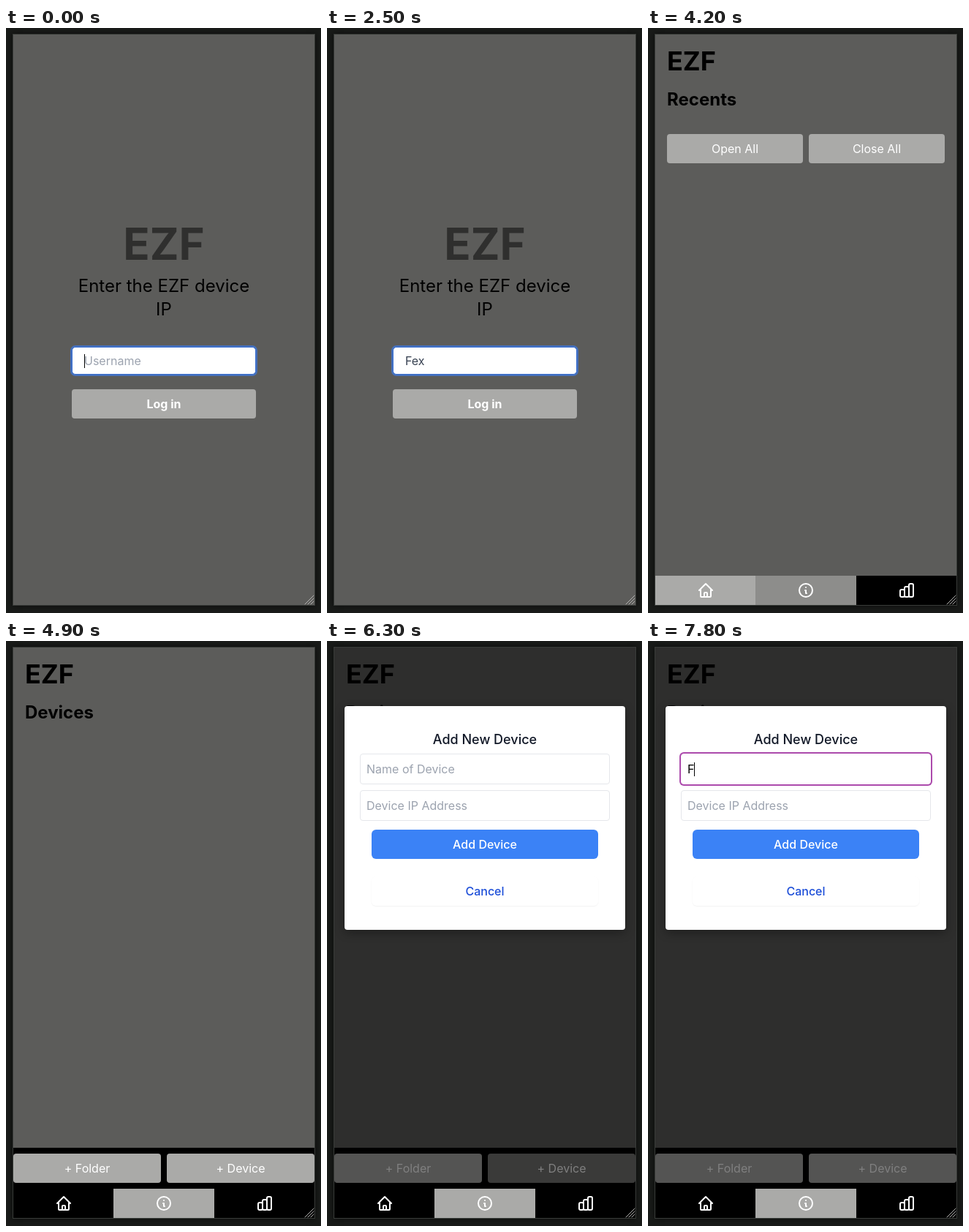
Recreate the animation shown at these times as an HTML page. Size 431 by 800 pixels, loop 8000 ms.

```html
<!DOCTYPE html>
<html lang="en">
<head>
<meta charset="utf-8">
<title>Device manager</title>
<style>
  html, body { margin: 0; width: 100%; height: 100%; overflow: hidden; background: #191b19; }
  body { position: relative; font: 16px Inter, sans-serif; color: #000; }
  div, svg { position: absolute; box-sizing: border-box; white-space: pre; }
  [hidden] { display: none; }
  .screen { left: 0; top: 0; width: 431px; height: 800px; }
  .page { left: 10px; top: 9px; width: 412px; height: 780px; background: #5c5c5a;
    box-shadow: 0 0 0 1px #393c39, 0 0 8px 1px #0009; }
  .center, .button { text-align: center; }
  .button { height: 40px; line-height: 40px; border-radius: 4px; background: #aaaaa8; color: #fff; }
  .brand { left: 26px; top: 25px; font: bold 36px/40px Inter, sans-serif; }
  .heading { left: 26px; top: 82px; font: bold 24px/32px Inter, sans-serif; }
  .login { left: 90px; width: 252px; }
  .lead { font-size: 24px; line-height: 32px; }
  .field { background: #fff; color: #9ca3af; }
  .login.field { top: 436px; height: 38px; padding-left: 16px; line-height: 36px;
    border: 1px solid #3b70d2; border-radius: 5px; box-shadow: 0 0 0 2px #456fb9; }
  .modal .field { left: 45px; width: 342px; height: 42px; padding-left: 8px; line-height: 40px;
    border: 1px solid #e5e7eb; border-radius: 4px; }
  .modal .field.focus { border-color: #fff; box-shadow: 0 0 0 2px #ac4aac; }
  .caret { width: 1px; height: 19px; background: #000; }
  .tab { top: 749px; height: 40px; }
  .tab svg { left: 50%; top: 8px; margin-left: -12px; }
  svg { fill: none; stroke: #fff; stroke-width: 2; stroke-linecap: round; stroke-linejoin: round; }
  .modal .button { left: 61px; width: 310px; border-radius: 6px; font-weight: 500; }
</style>
</head>
<body>
<div class="page"></div>

<div class="screen" id="login">
  <div class="login center" style="top:265px;font:bold 60px/60px Inter,sans-serif;color:#2f2f2e">EZF</div>
  <div class="login center lead" style="top:337px">Enter the EZF device
IP</div>
  <div class="login field" id="user"></div>
  <div class="caret" id="userCaret" style="top:446px"></div>
  <div class="login button" style="top:494px;font-weight:bold">Log in</div>
</div>

<div class="screen" id="home">
  <div class="brand">EZF</div>
  <div class="heading">Recents</div>
  <div class="button" style="left:26px;top:145px;width:186px">Open All</div>
  <div class="button" style="left:220px;top:145px;width:186px">Close All</div>
</div>

<div class="screen" id="devices">
  <div class="brand">EZF</div>
  <div class="heading">Devices</div>
  <div style="left:10px;top:693px;width:412px;height:56px;background:#000"></div>
  <div class="button" style="left:10px;top:701px;width:202px">+ Folder</div>
  <div class="button" id="addDevice" style="left:220px;top:701px;width:202px">+ Device</div>
</div>

<div class="screen modal" id="modal">
  <div style="left:10px;top:9px;width:412px;height:740px;background:#00000080"></div>
  <div style="left:24px;top:89px;width:384px;height:306px;background:#fff;border-radius:4px;box-shadow:0 4px 14px #0005"></div>
  <div class="center" style="left:24px;top:123px;width:384px;font:500 18px/24px Inter,sans-serif;color:#111827">Add New Device</div>
  <div class="field" id="device" style="top:154px"></div>
  <div class="caret" id="deviceCaret" style="top:166px"></div>
  <div class="field" style="top:204px">Device IP Address</div>
  <div class="button" style="top:258px;background:#3b82f6">Add Device</div>
  <div class="button" style="top:322px;background:#fff;color:#1d4ed8;box-shadow:0 1px 2px #0000000d">Cancel</div>
</div>

<div class="screen" id="nav">
  <div class="tab" style="left:10px;width:137px"><svg width="24" height="24"><path d="M3 12l2-2m0 0l7-7 7 7M5 10v10a1 1 0 001 1h3m10-11l2 2m-2-2v10a1 1 0 01-1 1h-3m-6 0a1 1 0 001-1v-4a1 1 0 011-1h2a1 1 0 011 1v4a1 1 0 001 1m-6 0h6"/></svg></div>
  <div class="tab" style="left:147px;width:138px"><svg width="24" height="24"><path d="M13 16h-1v-4h-1m1-4h.01M21 12a9 9 0 11-18 0 9 9 0 0118 0z"/></svg></div>
  <div class="tab" style="left:285px;width:137px"><svg width="24" height="24"><path d="M9 19v-6a2 2 0 00-2-2H5a2 2 0 00-2 2v6a2 2 0 002 2h2a2 2 0 002-2zm0 0V9a2 2 0 012-2h2a2 2 0 012 2v10m-6 0a2 2 0 002 2h2a2 2 0 002-2m0 0V5a2 2 0 012-2h2a2 2 0 012 2v14a2 2 0 01-2 2h-2a2 2 0 01-2-2z"/></svg></div>
</div>

<svg width="14" height="14" style="left:408px;top:775px;stroke:#b4b4b2;stroke-width:1"><path d="M1 13L13 1M5 13L13 5M9 13L13 9"/></svg>

<script>
const LOOP = 8000;
const USER = "Fex";
const KEY_TIMES = [1800, 2100, 2400];
const CARET_X = [107, 116, 125, 134];
// Hover strength of the "+ Device" button, one value per 100 ms
const HOVER = [0, .37, .87, 1, .8, .5, .25, .1, 0];
const $ = id => document.getElementById(id);
const tabs = document.querySelectorAll(".tab");

const show = (id, visible) => { $(id).hidden = !visible; };

function setField(id, typed, placeholder, color) {
  $(id).textContent = typed || placeholder;
  $(id).style.color = typed ? color : "";
}

function setCaret(id, visible, x) {
  show(id, visible);
  $(id).style.left = x + "px";
}

function render(t) {
  const onDevices = t >= 4900;
  show("login", t < 2900);
  show("home", t >= 2900 && !onDevices);
  show("devices", onDevices);
  show("modal", t >= 6300);
  show("nav", t >= 2900);

  const typed = KEY_TIMES.filter(k => t >= k).length;
  setField("user", USER.slice(0, typed), "Username", "#374151");
  setCaret("userCaret", t < 1200 || (t >= 1800 && t < 2500), CARET_X[typed]);

  const infoColor = onDevices ? "#aaaaa8" : t >= 4200 ? "#8d8d8b" : "#000";
  [onDevices ? "#000" : "#aaaaa8", infoColor, "#000"]
    .forEach((color, i) => { tabs[i].style.background = color; });

  const gray = Math.round(170 - 54 * (HOVER[Math.floor((t - 6000) / 100)] || 0));
  $("addDevice").style.background = `rgb(${gray},${gray},${gray - 2})`;

  const named = t >= 7800;
  setField("device", named ? "F" : "", "Name of Device", "#000");
  $("device").classList.toggle("focus", t >= 7100);
  setCaret("deviceCaret", t >= 7100, named ? 63 : 54);
}

const start = performance.now();
function tick() {
  render((performance.now() - start) % LOOP);
  requestAnimationFrame(tick);
}
tick();
</script>
</body>
</html>
```
